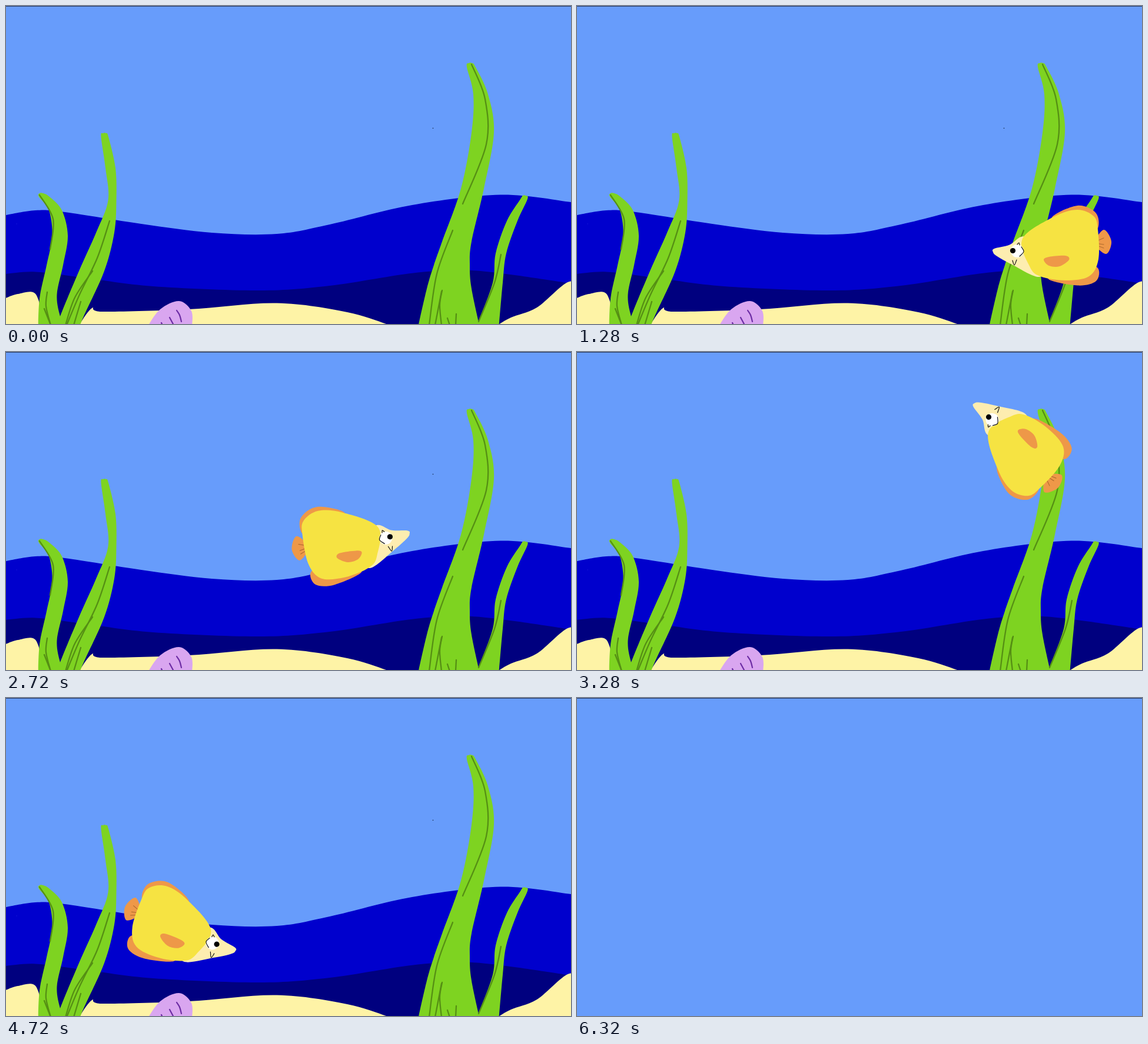
Recreate the animation shown at these times as an HTML page with a canvas. Size 960 by 540 pixels, loop 6.4 s.

```html
<!DOCTYPE html>
<html lang="en">
<head>
<meta charset="utf-8">
<title>Reef</title>
<style>
html, body { margin: 0; width: 100%; height: 100%; overflow: hidden; background: #679cfb; }
canvas { display: block; width: 960px; height: 540px; }
</style>
</head>
<body>
<canvas id="stage" width="960" height="540"></canvas>
<script>
const ctx = document.getElementById('stage').getContext('2d');
const LOOP = 6400, STEP = 80, CLEAR = 6320;
const SKY = '#679cfb', SEA = '#0000cd', DEEP = '#00007f', SAND = '#fef3a6';
const LEAF = '#7ed321', VEIN = '#558f14', SHELL = '#d9a6f0', RIDGE = '#6c2ca4';
const YELLOW = '#f6e342', ORANGE = '#ee9848', CREAM = '#fdedb0', RAY = '#a9672c';

const parse = text => text.split(' ').map(s => s.split(',').map(Number));

// Smooth path through a few points
function curve(p, closed) {
  const n = p.length;
  const at = i => closed ? p[(i + n) % n] : p[Math.max(0, Math.min(n - 1, i))];
  const path = new Path2D();
  path.moveTo(...p[0]);
  for (let i = 0; i < (closed ? n : n - 1); i++) {
    const [a, b, c, d] = [at(i - 1), at(i), at(i + 1), at(i + 2)];
    path.bezierCurveTo(
      b[0] + (c[0] - a[0]) / 6, b[1] + (c[1] - a[1]) / 6,
      c[0] - (d[0] - b[0]) / 6, c[1] - (d[1] - b[1]) / 6,
      c[0], c[1]);
  }
  return path;
}

const shape = (color, text) => ({ color, path: curve(parse(text)) });
const blob = (color, text) => ({ color, path: curve(parse(text), true) });
const line = (color, width, text) => ({ color, width, path: curve(parse(text)) });
const vein = text => line(VEIN, 2.3, text);

function hill(color, text) {
  const h = shape(color, text);
  h.path.lineTo(960, 560);
  h.path.lineTo(0, 560);
  return h;
}

// Seaweed: rows of "y,left,right" from tip to root
function blade(text) {
  const rows = parse(text);
  const left = rows.map(([y, l]) => [l, y]).reverse();
  const right = rows.map(([y, , r]) => [r, y]);
  return { color: LEAF, path: curve([...left, ...right]) };
}

function dot(color, x, y, r) {
  const path = new Path2D();
  path.arc(x, y, r, 0, Math.PI * 2);
  return { color, path };
}

function paint(parts) {
  for (const { color, width, path } of parts) {
    if (width) {
      ctx.strokeStyle = color;
      ctx.lineWidth = width;
      ctx.stroke(path);
    } else {
      ctx.fillStyle = color;
      ctx.fill(path);
    }
  }
}

const scene = [
  hill(SEA, '0,355 50,347 100,350 230,370 350,385 460,387 550,371 690,338 840,320.5 960,333'),
  hill(DEEP, '0,455 50,451.5 130,461 250,476 430,483 550,475 700,452.5 800,449.5 960,471'),
  shape(SAND, '-5,498 20,489 51,490 57,545 -5,545'),
  shape(SAND, '122,545 146,513 165,519 310,515 460,504.5 580,520 652,542'),
  shape(SAND, '832,544 858,529 902,512 962,468 966,545'),
  blade('318,57,63 324,56,74 347,73,95 390,78.5,105 440,69,97 490,58,86.5 527,55,92 550,55,102'),
  blade('216,165,170 222,161.5,174 275,169,186 330,173.5,187.5 385,153,184 450,124,167 527,92,132 550,86,123'),
  blade('97,786,792 104,783,798 150,794,819 215,791,829 310,773,812 400,741,791 440,727,788 480,715,791 550,699,806'),
  blade('322,878,883 328,874,886 365,851,869 420,832,850 470,827,844 537,802,838 550,796,836'),
  vein('57,321 80,362 75,413'),
  vein('70,486 68,510 76,542'),
  vein('65,514 76,542'),
  vein('176,365 155,428 125,490 103,542'),
  vein('147,450 117,495 101,542'),
  vein('127,502 115,542'),
  vein('791,99 814,158 816,235 776,336'),
  vein('759,381 732,455 719,542'),
  vein('741,483 737,508 740,542'),
  vein('740,485 729,542'),
  vein('765,523 764,542'),
  vein('750,530 754,542'),
  vein('841,422 830,470 803,536'),
  shape(SHELL, '240,545 262,515 294,501 315,518 316,545'),
  line(RIDGE, 2.2, '290,517 295,525 298,536'),
  line(RIDGE, 2.2, '278,529 285,542'),
  line(RIDGE, 2.2, '264,538 266,542'),
  dot('#10203c', 725.5, 207.5, .8),
  dot('#1c1cd8', 18, 370, .7)
];

// The fish is drawn facing left around its pivot
const PIVOT = [808, 408];
const fish = [
  blob(ORANGE, '880,403 895,380 908,400 899,421'),
  ...[394, 405, 411].map((y, i) => line(RAY, 1, `881,${400 + 3 * i} 895,${y}`)),
  blob(ORANGE, '806,361 850,339 882,352 883,380 850,380'),
  blob(ORANGE, '800,462 850,474.5 882,467 884,444 850,440'),
  blob(CREAM, '707,418 709,412 735,405.5 762,392 800,430 786,460 738,438.5 713,424.5'),
  blob(YELLOW, '757,395 810,358 850,346 878,357 885,380 886,430 870,459 830,466 787,459 769,442'),
  blob(ORANGE, '793,431 802,426 830,424 836,431 820,442 802,441'),
  dot('#fff', 748, 416, 11),
  dot('#000', 740.5, 415.5, 4.6),
  line('#111', 1.2, '755,409 759,417 752,425'),
  line('#111', 1.2, '748,405 751,402 752,406'),
  line('#111', 1.2, '740,432 743,440 747,431')
];

// Route stations: time, x, y, heading in degrees, speed in px/ms
const route = [
  [160, 1050, 400, 180, .2],
  [1280, 808, 408, 180, .35],
  [2240, 192, 445, -35, .7],
  [3280, 746, 160, -139.5, .75],
  [4160, 310, 226, 133.5, .75],
  [5280, 675, 442, 8.6, .9],
  [5600, 1090, 505, 8.6, 1.5]
];

// Cubic between stations; the fish points along its own velocity
function swim(t) {
  const i = route.findIndex(s => s[0] > t);
  const [a, b] = [route[i - 1], route[i]];
  const span = b[0] - a[0], u = (t - a[0]) / span;
  const axis = (k, trig) => {
    const pull = s => trig(s[3] * Math.PI / 180) * s[4] * span;
    const d = b[k] - a[k], m = pull(a), n = pull(b);
    const q = 3 * d - 2 * m - n, c = m + n - 2 * d;
    return [a[k] + u * (m + u * (q + u * c)), m + u * (2 * q + 3 * u * c)];
  };
  const [x, vx] = axis(1, Math.cos), [y, vy] = axis(2, Math.sin);
  return { x, y, angle: Math.atan2(vy, vx) };
}

// Rolls over once while turning on the left
function roll(t) {
  const u = Math.max(0, Math.min(1, (t - 1680) / 790));
  return -Math.cos(u * Math.PI);
}

function drawFish(t) {
  const { x, y, angle } = swim(t);
  const tall = roll(t), long = .92 + .08 * tall * tall;
  ctx.save();
  ctx.translate(x, y);
  ctx.rotate(angle);
  ctx.scale(-long, tall);
  ctx.translate(-PIVOT[0], -PIVOT[1]);
  paint(fish);
  ctx.restore();
}

function draw(t) {
  ctx.fillStyle = SKY;
  ctx.fillRect(0, 0, 960, 540);
  if (t < CLEAR) {
    paint(scene);
    if (t >= route[0][0] && t < route.at(-1)[0]) drawFish(t);
  }
  ctx.fillStyle = '#26375a';
  ctx.fillRect(0, 0, 960, 1);
}

ctx.lineCap = ctx.lineJoin = 'round';
const start = performance.now();
function tick() {
  const t = (performance.now() - start) % LOOP;
  draw(Math.floor(t / STEP) * STEP);
  requestAnimationFrame(tick);
}
tick();
</script>
</body>
</html>
```
